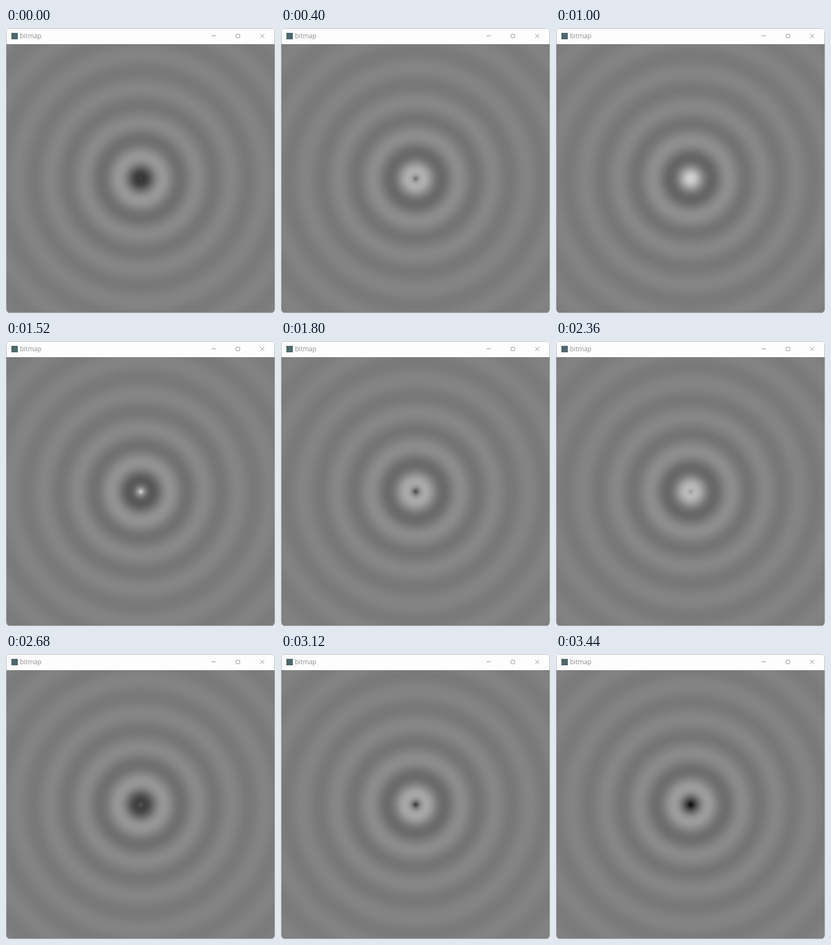
Recreate the animation shown at these times as an HTML page with a canvas. Size 500x529 px, loop 3480 ms.

```html
<!DOCTYPE html>
<html lang="en">
<head>
<meta charset="utf-8">
<title>bitmap</title>
<style>
  html, body { margin: 0; width: 100%; height: 100%; overflow: hidden; background: #f0f0f0; }
  #win { position: absolute; left: 0; top: 0; width: 500px; height: 529px;
         border-radius: 7px; overflow: hidden; background: #fdfdfd; }
  canvas { position: absolute; left: 1px; top: 30px; }
  svg { position: absolute; left: 0; top: 0; }
  text { font: 12px "Open Sans", "Noto Sans", sans-serif; fill: #8c8c8c; }
</style>
</head>
<body>
<div id="win">
  <canvas id="view" width="498" height="499"></canvas>
  <svg width="500" height="529" viewBox="0 0 500 529">
    <rect x="10" y="9" width="12" height="12" fill="#4d686d"/>
    <text x="26" y="19">bitmap</text>
    <g fill="none" stroke="#8f8f8f">
      <path d="M382 14.5h8"/>
      <rect x="427.5" y="11.5" width="7" height="6.5" rx="1"/>
      <path d="M472.5 11l7.5 7.5M480 11l-7.5 7.5"/>
    </g>
    <rect x=".5" y=".5" width="499" height="528" rx="6.5" fill="none" stroke="#b4b4b4"/>
  </svg>
</div>
<script>
const W = 498, H = 499, CX = 249, CY = 249;
const STEP = 40, STEPS = 87;
const FINE = 8; // brightness table entries per pixel of radius

// [step, phase in radians]; the wave hitches backwards just before the loop ends
const KEYS = [[0, 4.25], [10, 8.08], [25, 13.47], [38, 18.15], [53, 24.25],
              [67, 29.58], [84, 35.97], [85, 34.44], [86, 34.82]];

const ctx = document.getElementById('view').getContext('2d');
const img = ctx.createImageData(W, H);
const pixels = new Uint32Array(img.data.buffer);
const radius = new Uint16Array(W * H);
for (let y = 0, i = 0; y < H; y++)
  for (let x = 0; x < W; x++, i++)
    radius[i] = Math.round(Math.hypot(x - CX, y - CY) * FINE);
const table = new Uint32Array(360 * FINE);

function phaseAt(step) {
  let k = 1;
  while (KEYS[k][0] < step) k++;
  const [s0, p0] = KEYS[k - 1], [s1, p1] = KEYS[k];
  return p0 + (p1 - p0) * (step - s0) / (s1 - s0);
}

function draw(step) {
  const phase = phaseAt(step);
  for (let i = 0; i < table.length; i++) {
    const d = i / FINE / 10;
    const grey = Math.floor(127 + 127 * Math.cos(d - phase) / (d + 1));
    table[i] = (0xff000000 | grey * 0x010101) >>> 0;
  }
  for (let i = 0; i < pixels.length; i++) pixels[i] = table[radius[i]];
  ctx.putImageData(img, 0, 0);
}

let shown = -1;
function tick() {
  const step = Math.floor(performance.now() / STEP) % STEPS;
  if (step !== shown) draw(shown = step);
  requestAnimationFrame(tick);
}
tick();
</script>
</body>
</html>
```
